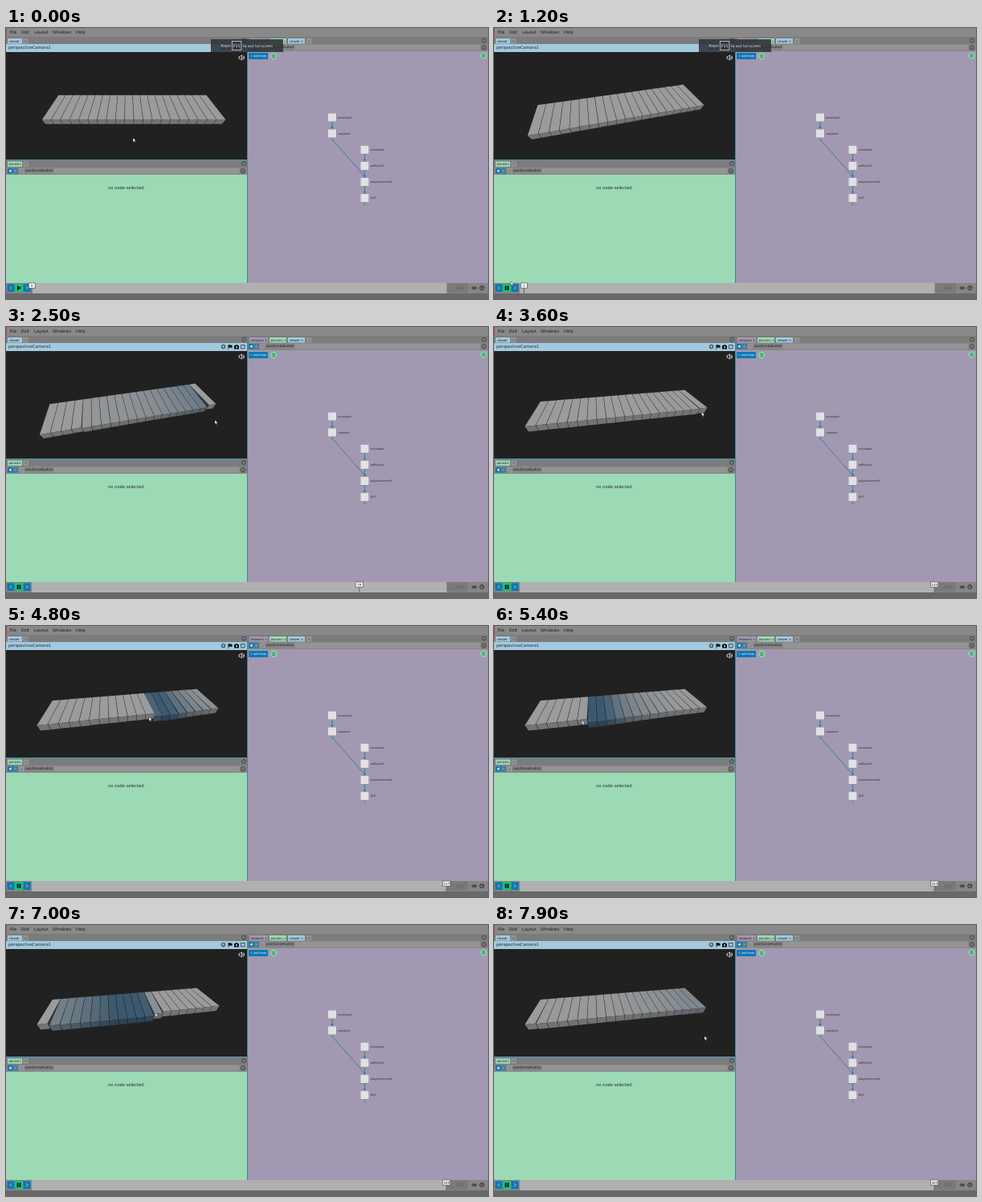
Write an HTML page with a canvas that moves like this. It is 600 px wide and 338 px high and loops after 8 s.

```html
<!DOCTYPE html>
<html>
<head>
<meta charset="utf-8">
<style>
html, body { margin: 0; width: 100%; height: 100%; overflow: hidden; background: #666; }
canvas { display: block; }
</style>
</head>
<body>
<canvas id="stage" width="600" height="338"></canvas>
<script>
const g = document.getElementById('stage').getContext('2d');
const LOOP = 8000, STEP = 100;
const BLUE = '#0d78b4', SKY = '#a3c9de', GREEN = '#9cd9b5', PURPLE = '#a398b1', LIME = '#7fd6a4';

// time, x, y
const cursorPath = [
  [0, 158, 139], [200, 158, 139], [500, 163, 140], [600, 163, 140], [1050, 21, 318], [1230, 21, 318],
  [1450, 92, 132], [2050, 250, 107], [2400, 260, 118], [2700, 260, 118], [3200, 260, 112],
  [4000, 257, 104], [4750, 182, 115], [4800, 178, 115.5], [5700, 75, 122], [6000, 63, 128.5],
  [6400, 63, 128.5], [6500, 70, 123], [7300, 255, 104], [7600, 262, 140.5]
];
// time, yaw, pitch in degrees
const cameraPath = [[0, 0, 44.3], [200, 0, 44.3], [600, 12, 47], [2600, 12, 47], [3200, 8.5, 37]];
// start, end, first key, last key
const sweeps = [[1450, 2050, 4, 18], [4000, 4750, 19, 12], [4820, 5700, 11, 2], [6500, 7300, 1, 19]];

function sample(path, t) {
  let i = 0;
  while (i < path.length - 1 && path[i + 1][0] <= t) i++;
  const a = path[i], b = path[i + 1] || a;
  const u = b === a ? 0 : (t - a[0]) / (b[0] - a[0]);
  return [a[1] + (b[1] - a[1]) * u, a[2] + (b[2] - a[2]) * u];
}

function rect(x, y, w, h, color) {
  g.fillStyle = color;
  g.fillRect(x, y, w, h);
}

function text(s, x, y, size, color = '#222', align = 'left') {
  g.font = size + 'px "DejaVu Sans", sans-serif';
  g.textAlign = align;
  g.fillStyle = color;
  g.fillText(s, x, y);
}

function poly(points, color) {
  g.beginPath();
  points.forEach(p => g.lineTo(p[0], p[1]));
  g.closePath();
  g.fillStyle = color;
  g.fill();
}

function stroke(points, color, width = 1) {
  g.beginPath();
  points.forEach(p => g.lineTo(p[0], p[1]));
  g.strokeStyle = color;
  g.lineWidth = width;
  g.stroke();
}

const line = (x1, y1, x2, y2, color, width) => stroke([[x1, y1], [x2, y2]], color, width);

function disc(x, y, r, color) {
  g.beginPath();
  g.arc(x, y, r, 0, 7);
  g.fillStyle = color;
  g.fill();
}

function ring(x, y, r, color, width = .8) {
  g.beginPath();
  g.arc(x, y, r, 0, 7);
  g.strokeStyle = color;
  g.lineWidth = width;
  g.stroke();
}

function frameBox(x, y, w, h, color) {
  g.strokeStyle = color;
  g.lineWidth = .7;
  g.strokeRect(x, y, w, h);
}

function pressOf(key, t) {
  let level = 0;
  for (const [start, end, a, b] of sweeps) {
    const u = (key - a) / (b - a), dt = t - start - u * (end - start);
    if (u >= 0 && u <= 1 && dt > 0)
      level = Math.max(level, Math.min(1, dt / 60) * Math.min(1, Math.exp((230 - dt) / 310)));
  }
  return level;
}

function drawKeys(t) {
  const [yaw, pitch] = sample(cameraPath, t).map(a => a * Math.PI / 180);
  const sy = Math.sin(yaw), cy = Math.cos(yaw), sp = Math.sin(pitch), cp = Math.cos(pitch);
  const focal = 143.7, dist = 1.4015, half = .212;
  const project = (x, y, z) => {
    const xr = x * cy + z * sy, zr = z * cy - x * sy;
    const k = focal / (dist - zr * cp - y * sp);
    return [150 + k * xr, 97 - k * (y * cp - zr * sp)];
  };
  const eye = -sy * dist * cp;
  const middle = i => -.87 + i * .1;
  const order = [...Array(20).keys()].sort((a, b) => Math.abs(middle(b) - eye) - Math.abs(middle(a) - eye));
  for (const i of order) {
    const e = pressOf(i, t), dip = .055 * Math.sqrt(e), l = middle(i) - .0475, r = middle(i) + .0475;
    const shade = f => `rgb(${[[155, 60], [155, 88], [155, 110]].map(([a, b]) => Math.round((a + (b - a) * e) * f))})`;
    const edge = (x, y) => [project(x, y, -half), project(x, y - dip, half)];
    const top = x => edge(x, -.005), low = x => edge(x, -.084);
    const side = middle(i) < eye ? r : l;
    const [st, sf] = top(side), [lb, lf] = low(side);
    const [a, b] = top(l), [d, c] = top(r);
    poly([st, sf, lf, lb], shade(.32));
    poly([a, b, c, d], shade(1));
    poly([b, c, low(r)[1], low(l)[1]], shade(.75));
  }
}

function tab(label, x, w, color) {
  rect(x, 13, w, 6.5, color);
  text(label, x + 1.5, 17.7, 4);
}

function pathBar(x, y, w) {
  rect(x, y, w, 9, '#858585');
  rect(x + 2, y + 1, 6.5, 6.5, BLUE);
  rect(x + 9, y + 1, 6, 6.5, '#3e7d9f');
  poly([[x + 3.5, y + 4.2], [x + 6.5, y + 2.3], [x + 6.5, y + 6.2]], '#e8f2f8');
  poly([[x + 13.5, y + 4.2], [x + 10.8, y + 2.5], [x + 10.8, y + 6]], '#7aa4ba');
  rect(x + 16, y + .8, w - 25.5, 7, '#949494');
  text('/', x + 18.5, y + 5.6, 4.2, '#444');
  rect(x + 22.5, y + 1, 37, 6.5, '#848484');
  text('positionalAudio1', x + 24, y + 5.4, 4.2);
  ring(x + w - 5, y + 4.3, 2.8, '#333');
  line(x + w - 5, y + 3.2, x + w - 5, y + 6, '#333', .8);
}

function viewer(t) {
  tab('viewer', 2, 18, SKY);
  rect(21, 13, 6.5, 6.5, '#929292');
  text('+', 24.2, 17.8, 4, '#444', 'center');
  ring(296, 15.5, 2.4, '#333');
  rect(0, 20, 300, 10, SKY);
  text('perspectiveCamera1', 3, 26.3, 5.1, '#1c2a33');
  ring(270.5, 24.6, 2.3, '#222', .9);
  stroke([[269.3, 24.6], [270.2, 25.5], [271.8, 23.8]], '#222', .7);
  line(276.8, 22.2, 276.8, 28, '#111', .7);
  poly([[277, 22.3], [281.5, 22.8], [281.5, 26], [277, 25.6]], '#111');
  rect(284, 23, 6, 4.5, '#111');
  rect(285.7, 22.2, 2.5, 1, '#111');
  disc(287, 25.2, 1.1, SKY);
  frameBox(292.7, 22.6, 4.3, 4.3, '#222');
  rect(0, 30, 300, 134, '#212121');
  drawKeys(t);
  stroke([[290, 35.7], [291.3, 35.7], [293.4, 33.8], [293.4, 40.1], [291.3, 38.2], [290, 38.2], [290, 35.7]], '#eee', .8);
  for (const r of [1.5, 3]) {
    g.beginPath();
    g.arc(293.6, 37, r, -1.1, 1.1);
    g.strokeStyle = '#eee';
    g.lineWidth = .8;
    g.stroke();
  }
  rect(0, 164, 300, 1.2, '#4f90b0');
}

function params() {
  rect(2, 166.5, 18, 6.5, GREEN);
  text('params', 3.5, 171.2, 4);
  rect(21.5, 166.5, 6.5, 6.5, '#929292');
  text('+', 24.7, 171.3, 4, '#444', 'center');
  ring(296, 169, 2.4, '#333');
  pathBar(0, 174, 300);
  rect(0, 183, 300, 135, GREEN);
  text('no node selected.', 150, 200.5, 5.15, '#1f2b24', 'center');
}

function node(name, x, y, hasInput = true) {
  if (hasInput) disc(x, y - 7.3, 1.2, '#1674a3');
  disc(x, y + 7.3, 1.2, '#35a08f');
  rect(x - 5, y - 5, 10.5, 10.5, '#8d829a');
  rect(x - 5, y - 5, 10, 10, '#e3dfe7');
  text(name, x + 7.2, y + 1, 3.3, '#25202b');
}

function network() {
  tab('network ×', 303, 23, PURPLE);
  tab('params ×', 328, 21, GREEN);
  tab('viewer ×', 351, 21, SKY);
  rect(374, 13, 6.5, 6.5, '#929292');
  text('+', 377.2, 17.8, 4, '#444', 'center');
  ring(595, 15.5, 2.4, '#333');
  pathBar(300, 20, 300);
  rect(301, 29, 299, 289, PURPLE);
  rect(302, 31, 24, 8, BLUE);
  text('+ Add Node', 314, 36.2, 3.4, '#e9f4fa', 'center');
  disc(333.3, 35, 4.2, LIME);
  for (const y of [33.4, 35, 36.6]) line(331.3, y, 335.3, y, '#2c6949', .7);
  disc(594.5, 34.7, 4.2, LIME);
  for (const y of [34.3, 36.8]) stroke([[592.6, y], [594.5, y - 1.8], [596.4, y]], '#234', .8);
  const wire = (...p) => line(...p, '#23809c', .9);
  wire(406, 119, 406, 124);
  wire(406, 139, 446.5, 185);
  for (const y of [159, 179, 199]) wire(446.5, y, 446.5, y + 6);
  node('envelope2', 406, 111.5, false);
  node('sampler1', 406, 131.5);
  ['envelope1', 'adfSynth1', 'playInstrument1', 'OUT'].forEach((n, i) =>
    node(n, 446.5, 151.8 + i * 20.1, i > 0));
}

function timeline(t) {
  const frame = Math.max(0, Math.round((t - 1183) * .06));
  rect(0, 318, 600, 13, '#858585');
  rect(0, 331, 600, 7, '#696969');
  rect(32, 318, 516.5, 13, '#b0b0b0');
  rect(1.5, 319.5, 9, 9.5, BLUE);
  rect(11, 319.5, 10, 9.5, '#0dcb70');
  rect(21.5, 319.5, 9, 9.5, BLUE);
  stroke([[6.8, 322.6], [5.2, 324.2], [6.8, 325.8]], '#e4f1f8', .8);
  stroke([[25.4, 322.6], [27, 324.2], [25.4, 325.8]], '#e4f1f8', .8);
  if (frame) {
    rect(13.7, 321.5, 1.8, 5.5, '#102');
    rect(16.6, 321.5, 1.8, 5.5, '#102');
  } else poly([[14, 321.2], [19, 324.2], [14, 327.2]], '#102');
  rect(549, 318.5, 26, 11.5, '#7a7a7a');
  text('100', 565, 326, 5.2, '#5c5c5c', 'center');
  ring(581.5, 324.3, 1.3, '#222', .9);
  ring(584.3, 324.3, 1.3, '#222', .9);
  ring(592.4, 324.2, 2.5, '#222', .9);
  stroke([[592.4, 322.6], [592.4, 324.3], [593.8, 324.3]], '#222', .7);
  const x = 32.2 + Math.min(frame, 100) * 5.16;
  line(x, 324, x, 331, '#555', .8);
  const w = frame > 9 ? 9.5 : 8;
  rect(x - w / 2, 318, w, 6.5, '#f2f2f2');
  frameBox(x - w / 2, 318, w, 6.5, '#555');
  text(frame, x, 322.8, 4, '#222', 'center');
}

function notice(t) {
  g.globalAlpha = Math.max(0, Math.min(1, (2100 - t) / 200));
  rect(255, 14, 90, 16, 'rgba(48,52,56,.88)');
  text('Press', 267.5, 24.2, 4.7, '#e6e6e6');
  frameBox(281.3, 16.6, 11.6, 11, '#ddd');
  text('F11', 287.1, 24, 4.6, '#e6e6e6', 'center');
  text('to exit full screen', 295, 24.2, 4.3, '#e6e6e6');
  g.globalAlpha = 1;
}

function cursor(t) {
  const [x, y] = sample(cursorPath, t);
  const shape = [[0, 0], [0, 5], [1.2, 4], [2.1, 5.8], [3, 5.3], [2.2, 3.6], [3.7, 3.5]];
  poly(shape.map(p => [x + p[0], y - 2 + p[1]]), '#fff');
  g.strokeStyle = '#111';
  g.lineWidth = .4;
  g.stroke();
}

function draw(t) {
  rect(0, 0, 600, 338, '#7c7c7c');
  rect(0, 0, 600, 11, '#898989');
  rect(0, 0, 1, 11, '#b8434a');
  [['File', 4.5], ['Edit', 19], ['Layout', 35], ['Windows', 58], ['Help', 87]].forEach(([s, x]) =>
    text(s, x, 7.1, 5.2, '#1c1c1c'));
  viewer(t);
  params();
  network();
  rect(300, 12, 1, 306, '#4d7f96');
  timeline(t);
  notice(t);
  cursor(t);
}

function tick() {
  draw(Math.floor(performance.now() % LOOP / STEP) * STEP);
  requestAnimationFrame(tick);
}
tick();
</script>
</body>
</html>
```
